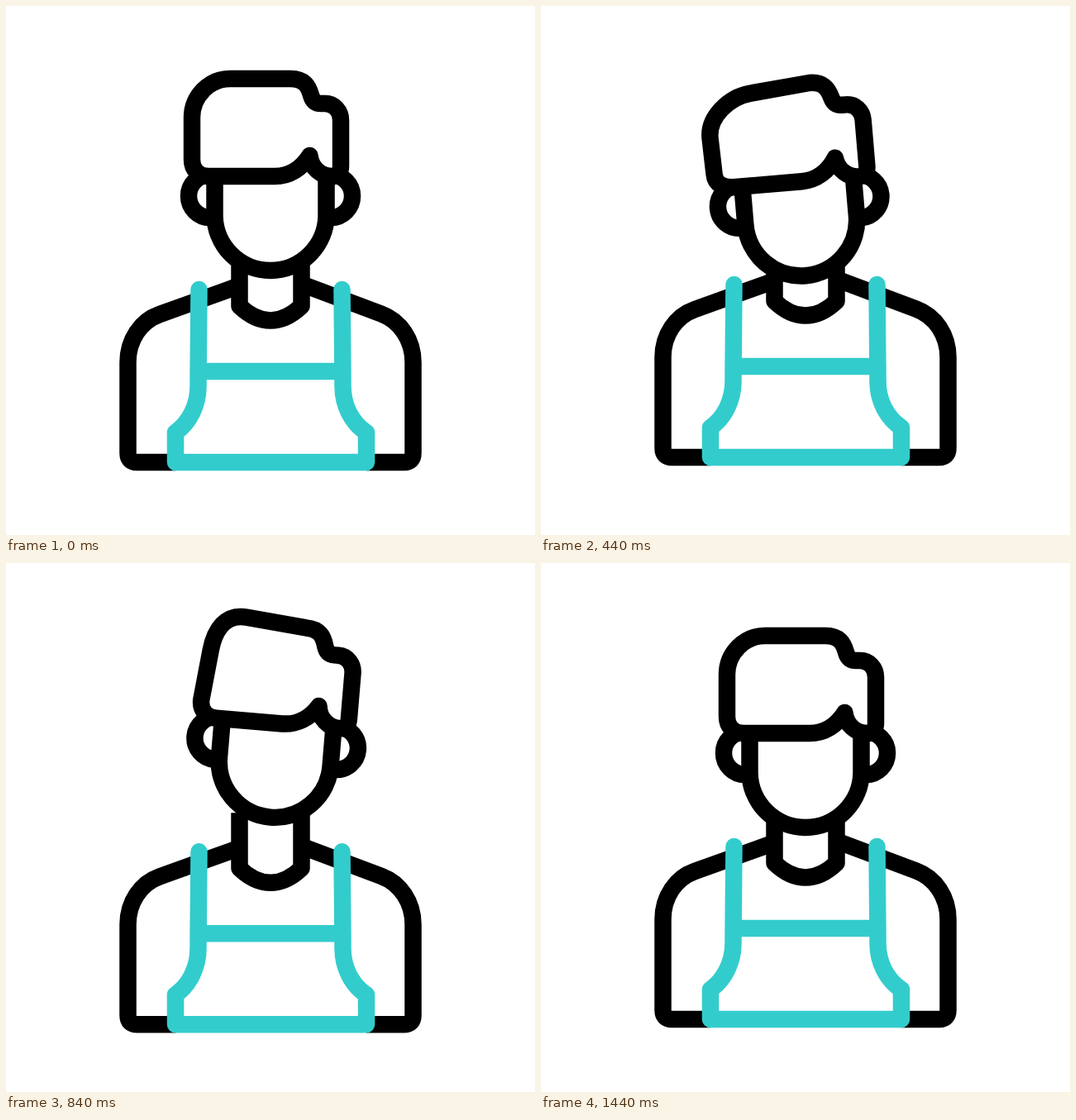
These frames come from a looping animation (640 by 640 pixels, 1520 ms). An HTML page:

```html
<!DOCTYPE html>
<html lang="en">
<head>
<meta charset="utf-8">
<style>
  html, body { margin: 0; width: 100%; height: 100%; overflow: hidden; background: #fff; }
  svg { display: block; width: 100%; height: 100%; }
</style>
</head>
<body>
<svg viewBox="0 0 640 640" fill="none" stroke="#000" stroke-width="20.5" stroke-linejoin="round">
  <g id="body">
    <path d="M282 338.500L186 373C163 381 147.500 404 147.500 431V541Q147.500 552 158.500 552H205"/>
    <path d="M358 336.500L454 372.500C477 381 492.500 404 492.500 431V541Q492.500 552 481.500 552H436"/>
    <path d="M282.500 296V363C294 374 306 380.500 320 380.500S346 374 357.500 363V296"/>
    <g stroke="#3cc" stroke-linecap="round">
      <path d="M233.500 343L232.500 453V460C232.500 483 222 504 205 516V552H436V516C418 504 407.500 483 407.500 460V453L406.500 343"/>
      <path d="M233 442H407"/>
    </g>
  </g>
  <g id="head">
    <path d="M247 204A26 26 0 0 0 247 256M393 204A26 26 0 0 1 393 256"/>
    <path fill="#fff" d="M252.500 206V252.500A67.500 67.500 0 0 0 387.500 252.500V206"/>
    <path id="hair" fill="#fff"/>
  </g>
</svg>
<script>
const LOOP = 1520, STEP = 40;
const [body, head, hair] = ["body", "head", "hair"].map(id => document.getElementById(id));

const poseTimes = [100, 365, 420, 665, 800, 1060];
const hairTimes = [200, 480, 540, 730, 1130, 1440];

// Eased value at time t between keyed values
function track(t, times, values) {
  if (t <= times[0]) return values[0];
  const i = times.findIndex(end => t < end);
  if (i < 0) return values.at(-1);
  const u = (t - times[i - 1]) / (times[i] - times[i - 1]);
  return values[i - 1] + (values[i] - values[i - 1]) * u * u * (3 - 2 * u);
}

// Only the upper left of the hair swings; the rest follows the head
function hairPath(sway) {
  const drop = Math.max(sway, 0);
  const low = { x: 225 - 0.75 * drop, y: 186 + 0.4 * drop };
  const side = { x: 225 - 0.95 * sway, y: 135 + 1.5 * sway };
  const top = { x: 271, y: 88 + sway };
  const lean = (side.x - low.x) / (low.y - side.y);
  return `M${low.x} ${low.y}L${side.x} ${side.y}
    C${side.x + 26 * lean} ${side.y - 26} ${top.x - 25} ${top.y + 25 * sway / 73} ${top.x} ${top.y}
    L344 88C361 88 366 97 369 108C371 115 375 118 381 118H386
    C397 118 405 127 405 138V194C405 201 401 206 395 206
    C381 206 369 196 367.500 181C358 196 343 206 325 206H245
    C${233 - 0.5 * drop} 206 ${low.x} ${low.y + 12} ${low.x} ${low.y}Z`;
}

function draw() {
  const t = Math.floor(performance.now() % LOOP / STEP) * STEP;
  const pose = (...values) => track(t, poseTimes, values);
  const bodyY = pose(0, -6.2, -6.2, 6.8, 6.8, 0);
  const headY = pose(0, 6.6, 6.6, -13.2, -13.2, 0);
  const tilt = pose(0, -5.05, -5.05, 5.1, 5.1, 0);
  body.setAttribute("transform", `translate(0 ${bodyY})`);
  head.setAttribute("transform", `translate(0 ${headY}) rotate(${tilt} 320 316)`);
  hair.setAttribute("d", hairPath(track(t, hairTimes, [0, 7, 7, -9, 3, 0])));
  requestAnimationFrame(draw);
}
draw();
</script>
</body>
</html>
```
